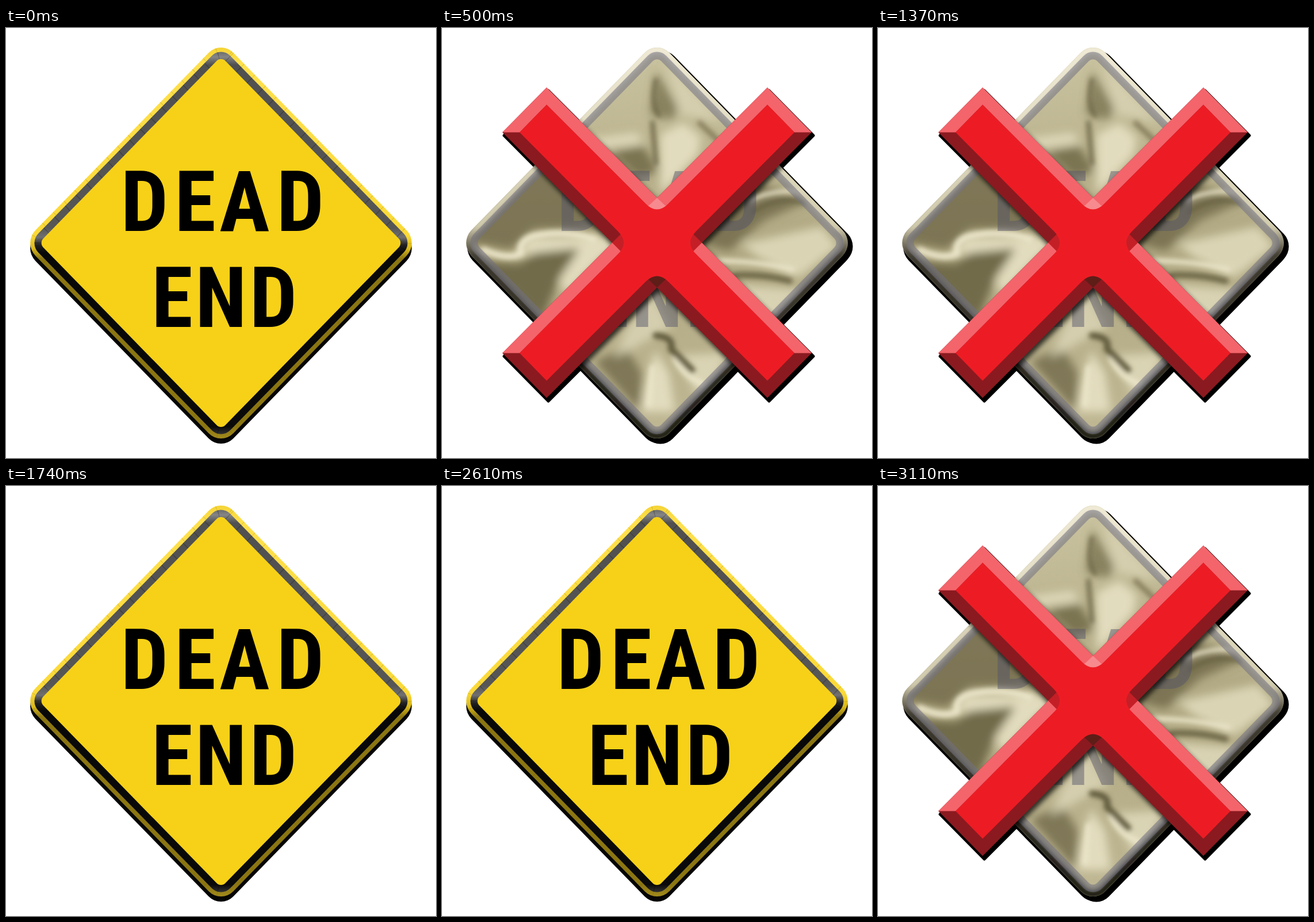
An HTML page for the animation above (3.48 s loop, 748 by 748 pixels).

```html
<!DOCTYPE html>
<html lang="en">
<head>
<meta charset="utf-8">
<title>Dead end sign</title>
<style>
  html, body { margin: 0; width: 100%; height: 100%; overflow: hidden; background: #fff; }
  svg { display: block; width: 100vw; height: 100vh; }
  .words { font: 600 146px "Roboto Condensed", Roboto, sans-serif; font-stretch: 80%; text-anchor: middle; }
  .yellow, .satin, .cross { animation: 870ms step-end infinite; }
  .yellow { animation-name: yellow; }
  .satin { animation-name: satin; }
  .cross { animation-name: cross; }
  @keyframes yellow { 0% { visibility: visible } 34.482%, 100% { visibility: hidden } }
  @keyframes satin { 0% { visibility: hidden } 34.482%, 100% { visibility: visible } }
  @keyframes cross { 0% { visibility: hidden } 57.471%, 100% { visibility: visible } }
  .folds { fill: none; stroke-linecap: round; stroke-linejoin: round; }
  .areas .dark { fill: #6b6443; }
  .areas .light { fill: #e2dcbe; }
  .folds .dark { stroke: #5f583a; }
  .folds .light { stroke: #ece6ca; }
</style>
</head>
<body>
<svg viewBox="0 0 748 748">
  <defs>
    <!-- One diamond; the stroke width sets the size and corner rounding -->
    <path id="diamond" d="M0-309 309 0 0 309-309 0Z" stroke-linejoin="round"/>
    <rect id="band" x="-235.5" y="-235.5" width="471" height="471" rx="17" transform="rotate(45)" fill="none" stroke-width="13"/>
    <rect id="rim" x="-246" y="-246" width="492" height="492" rx="27.5" transform="rotate(45)" fill="none"/>
    <path id="x" d="M-192-270 0-78 192-270 269-192 78 0 269 192 192 270 0 78-192 270-269 192-78 0-269-192Z"/>
    <g id="words" class="words">
      <text x="241 329 415 512" y="353">DEAD</text>
      <text x="289 374 465" y="520">END</text>
    </g>

    <linearGradient id="edge" gradientUnits="userSpaceOnUse" x1="0" y1="-340" x2="0" y2="340">
      <stop offset="0" stop-color="#f5d436"/>
      <stop offset=".04" stop-color="#ffe04c"/>
      <stop offset=".48" stop-color="#fbd938"/>
      <stop offset=".515" stop-color="#d9b81b"/>
      <stop offset=".54" stop-color="#8b7612"/>
      <stop offset=".97" stop-color="#8b7612"/>
      <stop offset="1" stop-color="#a28a1c"/>
    </linearGradient>
    <linearGradient id="border" gradientUnits="userSpaceOnUse" x1="0" y1="-333" x2="0" y2="333">
      <stop offset="0" stop-color="#6b6b6b"/>
      <stop offset=".014" stop-color="#858585"/>
      <stop offset=".035" stop-color="#505050"/>
      <stop offset=".46" stop-color="#565656"/>
      <stop offset=".485" stop-color="#707070"/>
      <stop offset=".505" stop-color="#222"/>
      <stop offset=".525" stop-color="#080808"/>
      <stop offset=".98" stop-color="#0a0a0a"/>
      <stop offset="1" stop-color="#333"/>
    </linearGradient>
    <linearGradient id="satinRim" x1="0" y1="0" x2="1" y2="1">
      <stop offset="0" stop-color="#f3eedb"/>
      <stop offset=".46" stop-color="#d6d0b4"/>
      <stop offset=".53" stop-color="#35312a"/>
      <stop offset="1" stop-color="#14130e"/>
    </linearGradient>
    <linearGradient id="satinBase" gradientUnits="userSpaceOnUse" x1="0" y1="-340" x2="0" y2="340">
      <stop offset="0" stop-color="#cac3a0"/>
      <stop offset=".5" stop-color="#b0a882"/>
      <stop offset="1" stop-color="#c0b894"/>
    </linearGradient>

    <filter id="soft" filterUnits="userSpaceOnUse" x="0" y="0" width="748" height="748"><feGaussianBlur stdDeviation="8"/></filter>
    <filter id="crisp" filterUnits="userSpaceOnUse" x="0" y="0" width="748" height="748"><feGaussianBlur stdDeviation="4"/></filter>
    <mask id="plate" maskUnits="userSpaceOnUse" x="0" y="0" width="748" height="748">
      <use href="#diamond" transform="translate(374 374) scale(.976 1)" fill="#fff" stroke="#fff" stroke-width="62"/>
    </mask>
  </defs>

  <g class="yellow">
    <g transform="translate(374 374) scale(.976 1)">
      <use href="#diamond" y="9" fill="#050505" stroke="#050505" stroke-width="62"/>
      <use href="#diamond" fill="url(#edge)" stroke="url(#edge)" stroke-width="62"/>
      <use href="#diamond" fill="url(#border)" stroke="url(#border)" stroke-width="47"/>
      <use href="#band" stroke="#000" stroke-dasharray="1 26" opacity=".3"/>
      <use href="#rim" stroke="#6b5500" stroke-width="7.5" stroke-dasharray="1 26" opacity=".22"/>
      <use href="#diamond" fill="#f7d117" stroke="#f7d117" stroke-width="22"/>
    </g>
    <use href="#words"/>
  </g>

  <g class="cross" transform="translate(377 379)">
    <use href="#x" stroke="#000" stroke-width="5" stroke-linejoin="round"/>
  </g>

  <g class="satin">
    <g transform="translate(374 374) scale(.976 1)">
      <g stroke="#000" stroke-width="62">
        <use href="#diamond" x="9" y="6"/>
        <use href="#diamond" x="6" y="9.5"/>
        <use href="#diamond" x="2" y="8"/>
      </g>
      <use href="#diamond" fill="url(#satinBase)" stroke="url(#satinBase)" stroke-width="62"/>
    </g>
    <g mask="url(#plate)">
      <g class="areas" filter="url(#soft)">
        <g class="dark">
          <path d="M30 370 175 225 330 345 160 350 120 385Z" opacity=".75"/>
          <path d="M60 405 135 410 165 390 240 385 205 430 175 510Z" opacity=".9"/>
          <path d="M430 370 550 270 640 300 560 335 500 388Z" opacity=".75"/>
          <path d="M265 580 320 555 348 600 345 670Z" opacity=".75"/>
          <path d="M372 75 362 150 400 160 412 140Z" opacity=".65"/>
          <path d="M290 215 350 205 378 250 340 260Z" opacity=".8"/>
        </g>
        <g class="light">
          <path d="M130 395 150 365 290 362 300 380 215 465 205 440 240 382Z"/>
          <path d="M520 375 660 345 690 380 620 435 550 400Z" opacity=".85"/>
          <path d="M500 445 630 455 570 515Z" opacity=".8"/>
          <path d="M390 60 490 165 415 150Z" opacity=".6"/>
          <path d="M380 185 420 165 450 190 445 220 380 290Z"/>
          <path d="M240 195 340 182 350 200 290 208Z" opacity=".9"/>
          <path d="M365 460 400 520 300 575 320 525Z" opacity=".7"/>
          <path d="M370 560 395 600 405 668 345 668Z"/>
          <path d="M405 570 495 565 480 610 445 640Z" opacity=".8"/>
        </g>
      </g>
      <g class="folds" filter="url(#crisp)">
        <g class="light">
          <path d="M72 386Q115 405 138 392 132 370 160 362 215 350 265 368" stroke-width="11"/>
          <path d="M535 300Q570 282 625 284" stroke-width="7"/>
          <path d="M475 405Q550 405 610 420" stroke-width="8"/>
          <path d="M405 575Q420 605 455 620M366 590 360 655" stroke-width="9"/>
        </g>
        <g class="dark">
          <path d="M372 535Q405 538 398 558L435 595" stroke-width="11"/>
          <path d="M366 165 372 235" stroke-width="9" opacity=".7"/>
          <path d="M372 90Q362 135 378 153" stroke-width="7" opacity=".7"/>
          <path d="M448 165 480 195" stroke-width="9" opacity=".6"/>
          <path d="M540 320Q590 290 630 305" stroke-width="6" opacity=".7"/>
          <path d="M510 430Q560 428 605 440" stroke-width="10" opacity=".85"/>
        </g>
      </g>
      <g filter="url(#crisp)">
        <use href="#rim" transform="translate(374 374) scale(.976 1)" stroke="url(#satinRim)" stroke-width="15"/>
      </g>
    </g>
    <use href="#band" transform="translate(374 374) scale(.976 1)" stroke="#727284" opacity=".55"/>
    <use href="#words" fill="#54546a" opacity=".48"/>
  </g>

  <g class="cross">
    <g mask="url(#plate)">
      <g filter="url(#crisp)" opacity=".75"><use href="#x" x="377" y="380"/></g>
    </g>
    <g transform="translate(374 373.5)">
      <use href="#x" fill="#8a1a20"/>
      <g fill="#f4646b">
        <path d="M-192-270 0-78 192-270V-240L0-48-192-240Z"/>
        <path id="lit" d="M-269-192-192-270V-240L-239-192ZM-78 0-269 192H-239L-48 0Z"/>
        <use href="#lit" transform="scale(-1 1)"/>
      </g>
      <path d="M0-78-17-62 0-50 17-62Z" fill="#f78a8e"/>
      <path d="M0 78-17 62 0 50 17 62Z" fill="#5f1d18"/>
      <path d="M-78 0-62-16-50 0-62 16ZM78 0 62-16 50 0 62 16Z" fill="#c41f27"/>
      <path fill="#ed1c24" d="M-192-240-20-68Q0-48 20-68L192-240 239-192 68-20Q48 0 68 20L239 192 192 240 20 68Q0 48-20 68L-192 240-239 192-68 20Q-48 0-68-20L-239-192Z"/>
    </g>
  </g>
</svg>
</body>
</html>
```
